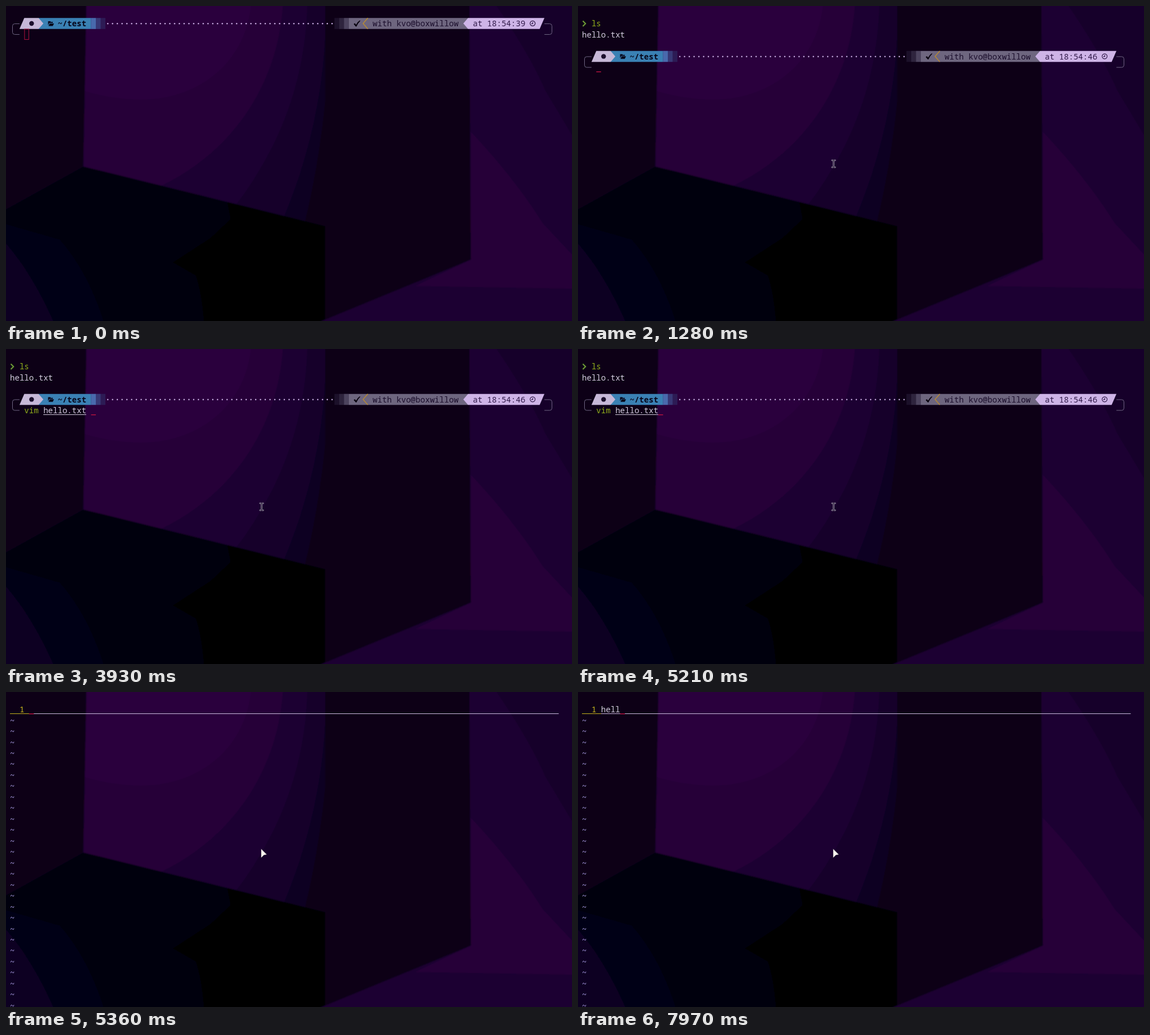
Animation of 1002 by 559 pixels, one loop 8000 ms. Source, as an HTML page:

```html
<!DOCTYPE html>
<html lang="en">
<head>
<meta charset="utf-8">
<title>Terminal session</title>
<style>
  html, body { margin: 0; width: 100%; height: 100%; overflow: hidden; background: #080019; }
  svg { display: block; width: 100vw; height: 100vh; }
  text { font: 14.08px "Noto Sans Mono", "DejaVu Sans Mono", monospace; white-space: pre; fill: #d2cddd; }
  .bold { font-weight: 700; fill: #06061a; }
  .cmd { font-weight: 500; fill: #93b01c; }
  .ghost { fill: #918b9f; }
  .dark { fill: #1b0e2c; }
  .time { fill: #2f1848; }
  .tilde { fill: #a79be0; }
  .num { fill: #c8b51e; }
  .frame { fill: none; stroke: #6e6682; stroke-width: 1; }
</style>
</head>
<body>
<svg viewBox="0 0 1002 559" preserveAspectRatio="none">
  <defs>
    <filter id="soft" filterUnits="userSpaceOnUse" x="-20" y="-20" width="1042" height="599">
      <feGaussianBlur stdDeviation="1.3"/>
    </filter>
    <clipPath id="wall"><path d="M143-20 565-20V391L137 285Z"/></clipPath>
    <pattern id="grain" width="2" height="2" patternUnits="userSpaceOnUse">
      <path d="M0 0h1v1h-1zM1 1h1v1h-1z" fill="#0d0224"/>
    </pattern>
  </defs>

  <g filter="url(#soft)">
    <path fill="#080019" d="M-20-20H1022V579H-20Z"/>
    <g clip-path="url(#wall)">
      <path fill="#0b0021" d="M130-20H565V170Q553 290 525 400H130Z"/>
      <path fill="#12002a" d="M130-20H565V60Q556 225 488 385H130Z"/>
      <path fill="#1b0030" d="M130-20H534Q534 190 402 360H130Z"/>
      <path fill="#250038" d="M130-20H491C488 130 405 262 262 325H130Z"/>
      <path fill="#2b003c" d="M130-20H435C432 100 340 166 240 166Q185 166 130 148Z"/>
    </g>
    <path fill="#030011" d="M137 285 565 391V579H-20V372Z"/>
    <path fill="#010009" d="M150 288 565 391V579H268Q250 480 213 443L145 420Q216 392 218 352 217 318 180 296Z"/>
    <path fill="#000" d="M392 348 565 391V579H352Q348 510 336 478L296 455 362 412 398 378Z"/>
    <path fill="#060019" d="M-20 382 95 415Q150 478 178 579H-20Z"/>
    <path fill="#090022" d="M-20 400Q45 465 92 579H-20Z"/>
    <path fill="#1b0030" d="M820-20H1022V579H510L566 556 823 450Z"/>
    <path fill="#130029" d="M855-20Q925 80 955 150L1022 262V-20Z"/>
    <path fill="#250038" d="M822 222Q900 305 950 385L1022 462V502L724 497 823 450Z"/>
  </g>

  <g id="past">
    <path d="M8.5 26.5 13.3 31.2 8.5 36" fill="none" stroke="#6f9f36" stroke-width="2"/>
  </g>
  <g id="prompt"></g>
  <g id="line"><text id="input"><tspan class="cmd" id="cmd"></tspan><tspan id="arg"></tspan><tspan class="ghost" id="ghost"></tspan></text>
    <path id="under" fill="#d2cddd" d="M66 116h76v1h-76z"/></g>
  <g id="vim">
    <path fill="#c8b51e" d="M7 38h34v1h-34z"/>
    <path fill="#cdbfe0" d="M41 38h937.5v1h-937.5z"/>
  </g>
  <rect id="cursor"/>
  <path id="beam" fill="#1a0a2c" stroke="#8e8798" stroke-width="1"
    d="M-3.5-7H-1L0-6.4 1-7H3.5V-5.4H1V5.4H3.5V7H1L0 6.4-1 7H-3.5V5.4H-1V-5.4H-3.5Z"/>
  <path id="arrow" fill="#fbf8ee" stroke="#1a0a2c" stroke-width=".6" d="M451.5 278 462 288.6 456.6 289.6 451.5 294.6Z"/>
</svg>

<script>
const LOOP = 8000, CW = 8.448, RH = 19.47, LEFT = 7, TOP = 21.3;
const $ = id => document.getElementById(id);
const colX = c => LEFT + c * CW;
const rowY = r => TOP + r * RH;

function add(parent, tag, attrs, text) {
  const el = document.createElementNS('http://www.w3.org/2000/svg', tag);
  for (const k in attrs) el.setAttribute(k, attrs[k]);
  if (text) el.textContent = text;
  parent.appendChild(el);
  return el;
}
const write = (parent, col, row, text, cls = '') =>
  add(parent, 'text', { x: colX(col), y: rowY(row) + 14.8, class: cls }, text);
const shape = (parent, d, fill) => add(parent, 'path', { d, fill });

function buildPrompt(g) {
  const t = TOP, b = TOP + RH, m = TOP + RH / 2, x = colX;
  const bar = (from, to, fill) => shape(g, `M${x(from)} ${t}H${x(to)}V${b}H${x(from)}Z`, fill);
  const shade = (col, fill, alpha) => {
    bar(col, col + 1, fill).setAttribute('opacity', alpha);
    bar(col, col + 1, 'url(#grain)').setAttribute('opacity', 0.45);
  };
  const curve = (edge, end) => {
    const s = Math.sign(end - edge) * 4;
    add(g, 'path', { class: 'frame',
      d: `M${end} 31.5H${edge + s}Q${edge} 31.5 ${edge} 35.5V46.5Q${edge} 50.5 ${edge + s} 50.5H${end}` });
  };
  curve(11.5, x(2));
  curve(966.5, x(112));

  bar(6, 17, '#3a81b4');
  shape(g, `M${x(3)} ${t}H${x(6)}L${x(7)} ${m} ${x(6)} ${b}H${x(2)}Z`, '#c6b8d7');
  add(g, 'circle', { cx: 45.3, cy: 31, r: 4.2, fill: '#1b0e2c' });
  shape(g, 'M74.5 27H78.3L79.5 28.3H83V30H76.8L74.5 34.2ZM77.4 30.9H85L82.8 35.4H75.2Z', '#06061a');
  write(g, 10, 0, '~/test', 'bold');
  [0.95, 0.5, 0.24].forEach((a, i) => shade(17 + i, '#5d90dd', a));

  for (let c = 20; c < 68; c++)
    add(g, 'circle', { cx: x(c + 0.5), cy: 31.3, r: 1.25, fill: '#c9ace2' });

  [0.2, 0.45, 0.85].forEach((a, i) => shade(68 + i, '#6e667f', a));
  bar(71, 96, '#6e667f');
  shape(g, 'M615.5 32 617.6 30.6 619.8 33.2Q622.5 28 626.2 25.6L627.3 26.4Q622.8 30.6 620.4 36.4H619.2Z', '#08030f');
  add(g, 'path', { d: `M${x(75)} ${t}L${x(74)} ${m} ${x(75)} ${b}`,
    fill: 'none', stroke: '#c08f2a', 'stroke-width': 1.3 });
  write(g, 76, 0, 'with kvo@boxwillow', 'dark');
  shape(g, `M${x(96)} ${t}H${x(112)}L${x(111)} ${b}H${x(96)}L${x(95)} ${m}Z`, '#ceb4e7');
  const clock = write(g, 97, 0, 'at 18:54:39', 'time');
  add(g, 'path', { d: 'M932.3 26.4a4.5 4.5 0 1 0 .01 0M932.5 28.5V31.3H930',
    fill: 'none', stroke: '#2f1848', 'stroke-width': 1.2 });
  return clock;
}

write($('past'), 2, 0, 'ls', 'cmd');
write($('past'), 0, 1, 'hello.txt');
const clock = buildPrompt($('prompt'));
write($('vim'), 2, 0, '1', 'num');
const buffer = write($('vim'), 4, 0, '');
for (let r = 1; r < 28; r++) write($('vim'), 0, r, '~', 'tilde');

// time, screen, command, argument, suggestion, cursor column (-1 hides it)
const STEPS = [
  [0, 'first', '', '', '', 3],
  [890, 'first', '', '', '', -1],
  [970, 'first', 'l', '', '', 4],
  [1130, 'first', 'ls', '', '', 5],
  [1280, 'second', '', '', '', 3],
  [1890, 'second', '', '', '', -1],
  [2490, 'second', '', '', '', 3],
  [2560, 'second', 'v', '', 'im hello.txt', 4],
  [2630, 'second', 'vi', '', 'm hello.txt', 5],
  [2850, 'second', 'vim', '', ' hello.txt', 6],
  [3000, 'second', 'vim', ' ', 'hello.txt', 7],
  [3610, 'second', 'vim', ' ', 'hello.txt', -1],
  [3800, 'second', 'vim', ' hello.txt', '', 16],
  [3930, 'second', 'vim', ' hello.txt', '', 17],
  [4500, 'second', 'vim', ' hello.txt', '', -1],
  [5100, 'second', 'vim', ' hello.txt', '', 17],
  [5210, 'second', 'vim', ' hello.txt', '', 16],
  [5250, 'clear', '', '', '', -1],
  [5360, 'vim', '', '', '', 4],
  [7270, 'vim', '', 'h', '', 5],
  [7630, 'vim', '', 'he', '', 6],
  [7840, 'vim', '', 'hel', '', 7],
  [7970, 'vim', '', 'hell', '', 8]
];
const MOUSE = [[50, 565, 549], [110, 530, 462], [170, 486, 356], [230, 458, 294], [290, 452.5, 280]];

const show = (id, on) => $(id).setAttribute('visibility', on ? 'visible' : 'hidden');
const at = (table, t) => table.findLast(s => s[0] <= t);

function setCursor(col, row, hollow) {
  const y = rowY(row);
  const box = hollow
    ? { x: colX(col) + 0.5, y: y + 0.2, width: CW - 1, height: RH - 1, fill: 'none', stroke: '#ad123f' }
    : { x: colX(col), y: Math.floor(y + 17), width: CW, height: 1.5, fill: '#b3133f', stroke: 'none' };
  for (const k in box) $('cursor').setAttribute(k, box[k]);
}

function render(t) {
  const [start, screen, cmd, arg, ghost, col] = at(STEPS, t);
  const second = screen === 'second', vim = screen === 'vim';
  const shell = second || screen === 'first';
  const row = second ? 4 : vim ? 0 : 1;

  show('past', second);
  show('prompt', shell);
  show('line', shell);
  show('vim', vim);
  show('under', second && start >= 3930);
  $('prompt').setAttribute('transform', `translate(0 ${second ? 3 * RH : 0})`);
  clock.textContent = second ? 'at 18:54:46' : 'at 18:54:39';

  $('input').setAttribute('x', colX(3));
  $('input').setAttribute('y', rowY(row) + 14.8);
  $('cmd').textContent = cmd;
  $('arg').textContent = vim ? '' : arg;
  $('ghost').textContent = ghost;
  buffer.textContent = vim ? arg : '';

  show('cursor', col >= 0);
  if (col >= 0) setCursor(col, row, t < 290);

  const mouse = at(MOUSE, t);
  show('beam', mouse && !vim);
  show('arrow', vim);
  if (mouse) $('beam').setAttribute('transform', `translate(${mouse[1]} ${mouse[2]})`);
}

const begin = performance.now();
function tick() {
  render((performance.now() - begin) % LOOP);
  requestAnimationFrame(tick);
}
tick();
</script>
</body>
</html>
```
